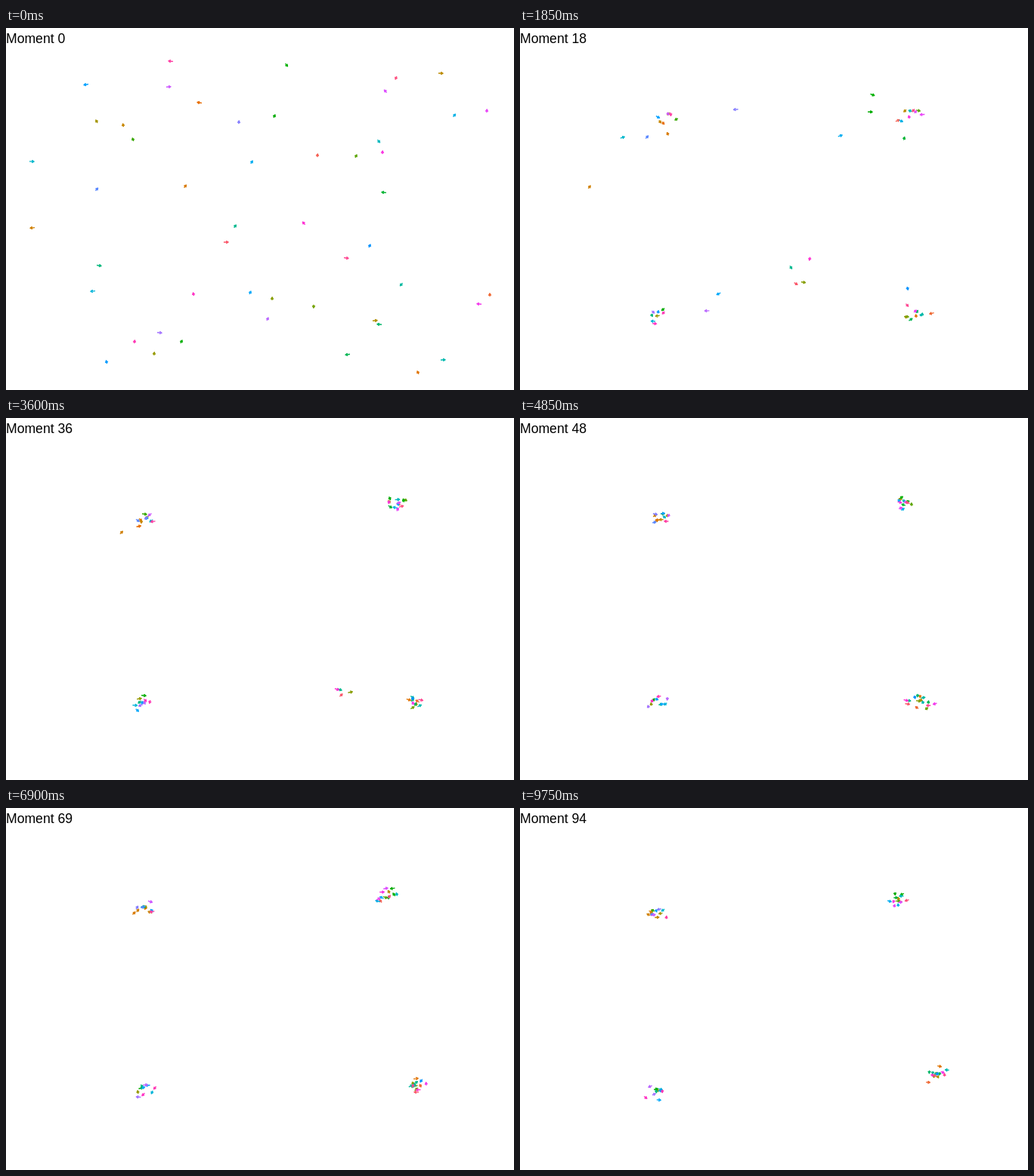
An HTML page that plays this animation: 672x480 px, repeating every 10000 ms.

```html
<!DOCTYPE html>
<html lang="en">
<head>
<meta charset="utf-8">
<title>Flocking agents</title>
<style>
html, body { margin: 0; width: 100%; height: 100%; overflow: hidden; background: #fff; }
svg { display: block; }
text { font: 17.6px "Liberation Sans", Arial, sans-serif; fill: #000; }
path { fill: none; stroke-width: 1.42; stroke-linejoin: round; }
</style>
</head>
<body>
<svg id="stage" width="672" height="480" viewBox="0 0 672 480">
  <text id="label" x="0" y="20">Moment 0</text>
</svg>
<script>
const SX = 6.11, SY = 4.16;          // pixels per world unit
const LOOP = 10000, FRAME = 50, LAST = 94.5;
const HEAD = 3.3, SPREAD = Math.PI / 6;

// Starting points; hue follows the order
const starts = [
  [412,169], [640,354], [256,99], [545,457], [237,210],
  [35,265], [155,129], [575,60], [488,388], [120,124],
  [196,432], [352,359], [407,369], [463,170], [168,148],
  [355,117], [232,416], [371,49], [500,218], [452,433],
  [494,393], [123,315], [303,263], [523,340], [578,440],
  [493,150], [34,177], [115,349], [593,116], [325,178],
  [323,351], [106,75], [133,443], [481,289], [120,214],
  [308,125], [203,404], [346,386], [215,78], [502,84],
  [636,110], [626,366], [498,165], [394,259], [248,353],
  [170,416], [218,44], [450,305], [516,66], [291,284]
];

// Agents that do not start out facing up
const left = [2, 5, 18, 19, 20, 27, 31, 41, 46];
const right = [7, 8, 21, 24, 26, 36, 38, 47, 49];
const down = [12, 17, 23, 25, 48];

// Flock centres drift through these points at the given moments
const keys = [18.5, 36, 48.5, 94];
const flocks = [
  [[195,124], [182,136], [187,131], [179,139]],
  [[515,115], [515,113], [507,111], [497,122]],
  [[178,381], [182,378], [184,376], [183,377]],
  [[525,381], [542,374], [534,377], [553,353]]
];
flocks.push([[372,336], [449,362], ...flocks[3].slice(2)]);   // late group
const homes = { 5: 0, 29: 1, 37: 2, 11: 4, 22: 4, 43: 4, 49: 4 };
const detours = { 30: [335,335], 35: [340,105], 43: [395,245] };

const lerp = (a, b, f) => a + (b - a) * f;
const clamp = (v, lo, hi) => Math.min(hi, Math.max(lo, v));

function seeded(s) {
  return () => {
    s = s + 0x6D2B79F5 | 0;
    let r = Math.imul(s ^ s >>> 15, 1 | s);
    r = r + Math.imul(r ^ r >>> 7, 61 | r) ^ r;
    return ((r ^ r >>> 14) >>> 0) / 2 ** 32;
  };
}

// Polar CIE-LUV to sRGB
function hcl(h, c, l) {
  const a = h * Math.PI / 180, y = ((l + 16) / 116) ** 3;
  const u = c * Math.cos(a) / (13 * l) + 0.1978;
  const v = c * Math.sin(a) / (13 * l) + 0.4683;
  const x = 9 * y * u / (4 * v), z = -x / 3 - 5 * y + 3 * y / v;
  const rgb = [
    3.2405 * x - 1.5372 * y - 0.4985 * z,
    -0.9693 * x + 1.876 * y + 0.0416 * z,
    0.0556 * x - 0.204 * y + 1.0573 * z
  ].map(n => {
    const g = n > 0.00304 ? 1.055 * n ** (1 / 2.4) - 0.055 : 12.92 * n;
    return Math.round(clamp(g, 0, 1) * 255);
  });
  return `rgb(${rgb})`;
}

function centre(flock, m) {
  const p = flocks[flock];
  let i = 0;
  while (i < keys.length - 2 && m > keys[i + 1]) i++;
  const f = clamp((m - keys[i]) / (keys[i + 1] - keys[i]), 0, 1);
  return p[i].map((v, j) => lerp(v, p[i + 1][j], f));
}

function heading(i, swing) {
  if (left.includes(i)) return Math.PI + swing(0.3);
  if (right.includes(i)) return swing(0.3);
  return (down.includes(i) ? 1 : -1) * Math.PI / 2 + swing(0.6);
}

// One unit per moment, turning towards the flock centre by a limited angle
function walk([x, y], i) {
  const rnd = seeded(i * 977 + 11);
  const swing = n => (rnd() * 2 - 1) * n;
  const home = homes[i] ?? (x < 336 ? 0 : 1) + (y < 250 ? 0 : 2);
  const limit = 0.75 + rnd() * 0.4;
  const aim = [swing(7), swing(5)];
  let detour = detours[i];
  let a = heading(i, swing);
  const steps = [];
  for (let m = 0; m <= 96; m++) {
    const vx = Math.cos(a) * SX, vy = Math.sin(a) * SY;
    steps.push([x, y, vx, vy]);
    x += vx;
    y += vy;
    if (detour && Math.hypot((detour[0] - x) / SX, (detour[1] - y) / SY) < 1.2) detour = null;
    const c = centre(home, m + 1);
    const [tx, ty] = detour || [c[0] + aim[0], c[1] + aim[1]];
    const want = Math.atan2((ty - y) / SY, (tx - x) / SX) - a;
    const turn = Math.atan2(Math.sin(want), Math.cos(want));
    a += clamp(turn, -limit, limit) + swing(0.2);
  }
  return steps;
}

const stage = document.getElementById("stage");
const label = document.getElementById("label");
const agents = starts.map((s, i) => {
  const path = document.createElementNS("http://www.w3.org/2000/svg", "path");
  path.setAttribute("stroke", hcl(15 + 7.2 * i, 120, 60));
  stage.append(path);
  return { path, steps: walk(s, i) };
});

function arrow(x, y, vx, vy) {
  const a = Math.atan2(vy, vx), tx = x + vx / 2, ty = y + vy / 2;
  const pt = (px, py) => px.toFixed(2) + " " + py.toFixed(2);
  const barb = s => pt(tx - HEAD * Math.cos(a + s), ty - HEAD * Math.sin(a + s));
  const tip = pt(tx, ty);
  return `M${pt(x - vx / 2, y - vy / 2)}L${tip}M${barb(SPREAD)}L${tip}L${barb(-SPREAD)}`;
}

function draw(ms) {
  const m = Math.min(Math.floor(ms / FRAME) * FRAME / 100, LAST);
  const k = Math.floor(m), f = m - k;
  label.textContent = "Moment " + k;
  for (const { path, steps } of agents) {
    const now = steps[k].map((v, j) => lerp(v, steps[k + 1][j], f));
    path.setAttribute("d", arrow(...now));
  }
}

const begin = performance.now();
function tick() {
  draw((performance.now() - begin) % LOOP);
  requestAnimationFrame(tick);
}
draw(0);
requestAnimationFrame(tick);
</script>
</body>
</html>
```
